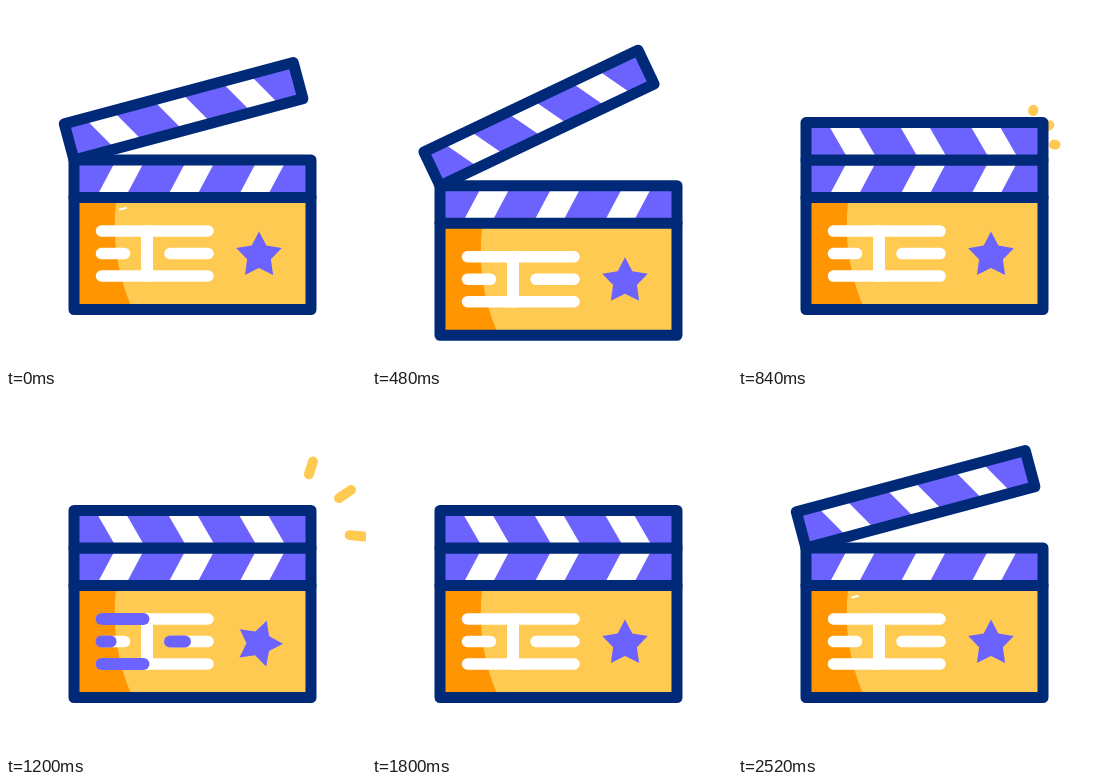
An HTML page with a canvas for the animation above (2600 ms loop, 360 px wide and 360 px high).

```html
<!DOCTYPE html>
<html lang="en">
<head>
<meta charset="utf-8">
<title>Clapperboard</title>
<style>
  html, body { margin: 0; width: 100%; height: 100%; overflow: hidden; background: #fff; }
  canvas { display: block; width: 360px; height: 360px; }
</style>
</head>
<body>
<canvas id="stage"></canvas>
<script>
const LOOP = 2600, SIZE = 360, RAD = Math.PI / 180;
const NAVY = '#002a78', PURPLE = '#6c63ff', YELLOW = '#ffca52', ORANGE = '#ff9500', WHITE = '#fff';
const PIVOT = { x: 68, y: 154 };

const canvas = document.getElementById('stage');
const ctx = canvas.getContext('2d');
const ratio = window.devicePixelRatio || 1;
canvas.width = canvas.height = SIZE * ratio;

const clamp = v => Math.min(1, Math.max(0, v));
const part = (t, from, to) => clamp((t - from) / (to - from));
const ease = (t, from, to) => (1 - Math.cos(Math.PI * part(t, from, to))) / 2;
const mix = (a, b, p) => a + (b - a) * p;

function fillPath(points, color) {
  ctx.beginPath();
  points.forEach(([x, y]) => ctx.lineTo(x, y));
  ctx.closePath();
  ctx.fillStyle = color;
  ctx.fill();
}

function stroke(color, width) {
  ctx.lineCap = ctx.lineJoin = 'round';
  ctx.strokeStyle = color;
  ctx.lineWidth = width;
  ctx.stroke();
}

function line(x1, y1, x2, y2, color, width) {
  ctx.beginPath();
  ctx.moveTo(x1, y1);
  ctx.lineTo(x2, y2);
  stroke(color, width);
}

function outline(x, y, w, h) {
  ctx.beginPath();
  ctx.rect(x, y, w, h);
  stroke(NAVY, 11);
}

// Draws the stretch of a line between two fractions of its length.
function trimmed([x1, y1, x2, y2], tail, head, color, width) {
  if (head <= tail) return;
  line(mix(x1, x2, tail), mix(y1, y2, tail), mix(x1, x2, head), mix(y1, y2, head), color, width);
}

function stripes(top, bottom, xTop, xBottom) {
  ctx.fillStyle = PURPLE;
  ctx.fillRect(70, top, 233, bottom - top);
  for (let i = 0; i < 3; i++) {
    const dx = i * 70.7;
    fillPath([[xTop + dx, top], [xTop + dx + 29, top],
              [xBottom + dx + 29, bottom], [xBottom + dx, bottom]], WHITE);
  }
}

function star(angle) {
  const points = [];
  for (let i = 0; i < 10; i++) {
    const r = i % 2 ? 12.5 : 24;
    const a = (angle - 90 + i * 36) * RAD;
    points.push([253 + r * Math.cos(a), 249.5 + r * Math.sin(a)]);
  }
  fillPath(points, PURPLE);
}

function lettering(t) {
  const bars = [[95.5, 225, 202, 225], [95.5, 247.5, 118.5, 247.5],
                [164, 247.5, 202, 247.5], [95.5, 270, 202, 270]];
  const head = ease(t, 985, 1485), tail = ease(t, 1210, 1710);
  line(141, 225, 141, 270, WHITE, 12);
  for (const bar of bars) {
    trimmed(bar, 0, 1, WHITE, 11.5);
    trimmed(bar, tail, head, PURPLE, 12);
  }
}

function board(t) {
  stripes(157, 189, 108.5, 91.5);
  ctx.fillStyle = YELLOW;
  ctx.fillRect(70, 194, 233, 107);
  ctx.beginPath();
  ctx.moveTo(70, 196);
  ctx.lineTo(110, 196);
  ctx.quadraticCurveTo(104, 250, 125, 300);
  ctx.lineTo(70, 300);
  ctx.fillStyle = ORANGE;
  ctx.fill();
  if (t < 260 || t > 1900) line(114, 203.5, 120, 202, WHITE, 2);
  lettering(t);
  star(360 * ease(t, 950, 1700));
  outline(68, 154, 237, 149.5);
  line(68, 191.5, 305, 191.5, NAVY, 11);
}

function arm(angle) {
  ctx.save();
  ctx.translate(PIVOT.x, PIVOT.y);
  ctx.rotate(-angle * RAD);
  ctx.translate(-PIVOT.x, -PIVOT.y);
  stripes(119, 151, 90.5, 109);
  outline(68, 116.5, 237, 37.5);
  ctx.restore();
}

function armAngle(t) {
  if (t < 420) return mix(15, 26, ease(t, 240, 420));
  if (t < 1000) return 26 * (1 - Math.pow(part(t, 420, 760), 2.2));
  return 15 * ease(t, 1893, 2520);
}

function sparks(t) {
  const rays = [[295, 105, 307, 67.5], [310, 120, 345, 96], [316, 138.5, 358, 142.5]];
  const head = ease(t, 800, 1140), tail = ease(t, 960, 1360);
  for (const ray of rays) trimmed(ray, tail, head, YELLOW, 10);
}

function swoosh(t) {
  const head = ease(t, 1900, 2150), tail = ease(t, 2060, 2420);
  if (head <= tail) return;
  ctx.beginPath();
  ctx.arc(263, 110, 72, mix(13, -71, tail) * RAD, mix(13, -71, head) * RAD, true);
  stroke(YELLOW, 10);
}

function draw(t) {
  ctx.setTransform(ratio, 0, 0, ratio, 0, 0);
  ctx.fillStyle = WHITE;
  ctx.fillRect(0, 0, SIZE, SIZE);
  sparks(t);
  swoosh(t);
  const dip = 27 * (ease(t, 240, 420) - ease(t, 420, 860));
  ctx.translate(0, dip);
  board(t);
  arm(armAngle(t));
}

const start = performance.now();
function tick() {
  draw((performance.now() - start) % LOOP);
  requestAnimationFrame(tick);
}
tick();
</script>
</body>
</html>
```
